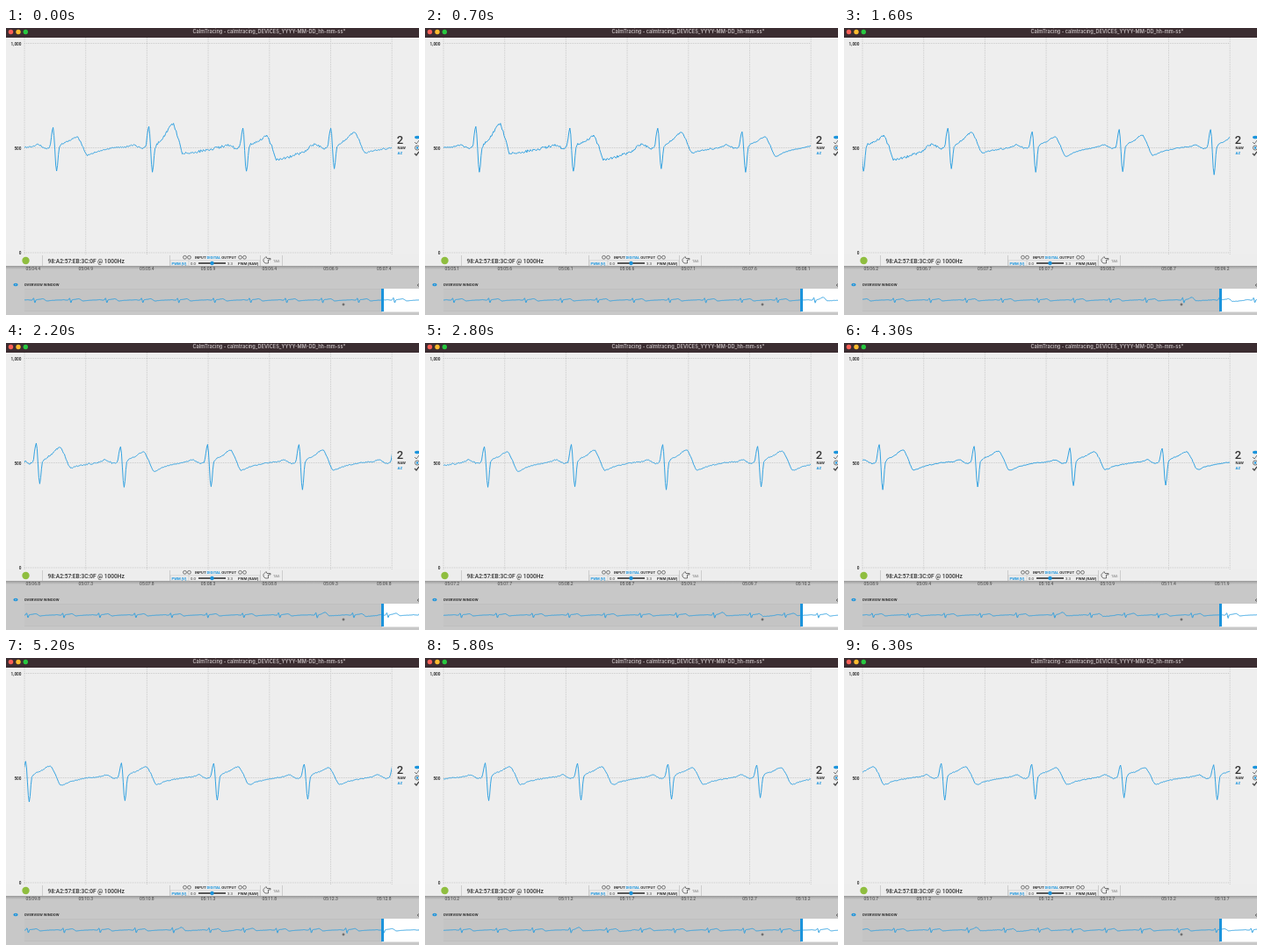
Animation, 470 px wide and 327 px high, one loop 6.4 s. Source, as an HTML page:

```html
<!DOCTYPE html>
<html lang="en">
<head>
<meta charset="utf-8">
<title>Signal monitor</title>
<style>
html, body { margin: 0; width: 100%; height: 100%; overflow: hidden; background: #eee; }
svg { display: block; width: 470px; height: 327px; font-family: Roboto, sans-serif; }
.dots { stroke: #c2c2c2; stroke-width: .8; stroke-dasharray: 1 1; }
.wave { fill: none; stroke: #2b9fe0; stroke-width: .95; stroke-linejoin: round; vector-effect: non-scaling-stroke; }
.small { font-size: 4.3px; font-weight: 700; }
.blue { fill: #1b94dc; }
.line { fill: none; stroke: #444; stroke-width: .7; }
</style>
</head>
<body>
<svg viewBox="0 0 470 327" fill="#333">
  <defs>
    <clipPath id="mainClip"><rect x="21" y="11" width="418" height="247"/></clipPath>
    <clipPath id="overClip"><rect x="21" y="297" width="449" height="26"/></clipPath>
    <linearGradient id="shade" x2="0" y2="1">
      <stop stop-color="#999"/><stop offset="1" stop-color="#c8c8c8"/>
    </linearGradient>
  </defs>

  <rect width="470" height="327" fill="#eee"/>
  <rect width="470" height="11" fill="#3b2d31"/>
  <circle cx="5.5" cy="4.5" r="2.7" fill="#ff5f57"/>
  <circle cx="14" cy="4.5" r="2.7" fill="#febc2e"/>
  <circle cx="22.3" cy="4.5" r="2.7" fill="#28c840"/>
  <text x="299.5" y="6.4" fill="#c4bcbe" text-anchor="middle" font-family="Inter, sans-serif" font-size="5.6" font-weight="600">CalmTracing - calmtracing_DEVICES_YYYY-MM-DD_hh-mm-ss*</text>

  <g id="grid"></g>
  <g font-size="4.7" font-weight="700" text-anchor="end">
    <text x="17.5" y="19.5">1,000</text><text x="17.5" y="138.5">500</text><text x="17.5" y="257.5">0</text>
  </g>
  <g clip-path="url(#mainClip)"><path id="mainWave" class="wave"/></g>

  <text x="444.7" y="131.8" font-size="13" font-weight="500">2</text>
  <text x="445.5" y="138" class="small">RAW</text>
  <text x="445.5" y="144" class="small blue">AZ</text>
  <ellipse cx="468" cy="124.5" rx="3" ry="1.8" class="blue"/>
  <path class="line" d="M465 130l2 2 3-4"/>
  <path class="line" d="M465 143l2 2 3-4" style="stroke-width: 1.3"/>
  <circle cx="468" cy="136.5" r="2.6" class="line"/><circle cx="468" cy="136.5" r="1.2" class="blue"/>

  <rect y="271" width="470" height="56" fill="#c8c8c8"/>
  <rect y="271" width="470" height="4" fill="url(#shade)"/>
  <g id="times" font-size="5" fill="#444"></g>
  <rect y="258.5" width="470" height="12.5" fill="#ededed"/>
  <circle cx="22.5" cy="265" r="4.2" fill="#8fbe3f"/>
  <path d="M41.5 259v12M186.5 259v12M289.5 259v12M314.5 259v12" stroke="#c4c4c4" stroke-width=".8"/>
  <path d="M187 264.8h21v6h-21zM208 264.8h81v6" fill="none" stroke="#c4c4c4" stroke-width=".6"/>
  <text x="47.5" y="268" font-size="6.6" font-weight="500">98:A2:57:EB:3C:0F @ 1000Hz</text>
  <g class="line">
    <circle cx="203.5" cy="261.3" r="1.9"/><circle cx="208.5" cy="261.3" r="1.9"/>
    <circle cx="266.5" cy="261.3" r="1.9"/><circle cx="271.5" cy="261.3" r="1.9"/>
  </g>
  <g class="small">
    <text x="215" y="263">INPUT <tspan class="blue">DIGITAL</tspan> OUTPUT</text>
    <text x="188.5" y="269.7" class="blue">PWM [V]</text>
    <text x="210" y="269.5" font-weight="400">0.0</text>
    <text x="252" y="269.5" font-weight="400">3.3</text>
    <text x="264" y="269.7">PWM [RAW]</text>
  </g>
  <path d="M219 268h31" stroke="#333" stroke-width="1.6"/>
  <circle cx="234.5" cy="268" r="2.2" class="blue"/>
  <path class="line" d="M293 263.5l3-3 1 2h4v1.5h-2.500v4h-3.500l-2-2z"/>
  <text x="304" y="266.6" font-size="4" fill="#777">TAG</text>

  <ellipse cx="11" cy="292.5" rx="2.6" ry="1.7" class="blue"/>
  <circle cx="11" cy="292.5" r=".7" fill="#c8c8c8"/>
  <text x="20.700" y="294.3" class="small">OVERVIEW WINDOW</text>
  <path class="line" d="M470 291.5l-2 1.500 2 1.500"/>
  <rect x="21" y="297" width="407" height="26" fill="#c4c4c4"/>
  <path d="M21 297.5H428M21 322.5H428" stroke="#bebebe" stroke-width=".7"/>
  <rect x="428" y="297" width="42" height="26.500" fill="#fff"/>
  <g clip-path="url(#overClip)"><path id="overWave" class="wave"/></g>
  <rect x="427" y="297" width="3" height="26" class="blue"/>
  <path d="M382.5 315h3M384 313.5v3" stroke="#333" stroke-width=".7"/>
</svg>

<script>
const $ = id => document.getElementById(id);
const PX_PER_SEC = 139.4, STEP = 20.95, BASE = 136.5;
const OVER_X = 0.39, OVER_Y = 0.115;

// Each beat: R position, R top, S dip, T top, T offset, trough
const beats = [
  [54, 114, 163, 124, 27, 145], [163, 112, 164, 109, 27, 143], [270, 115, 164, 123.5, 27, 150],
  [370, 114, 160, 119, 27, 142], [466, 118, 164, 124, 26, 146], [565, 116, 164, 122, 26, 145],
  [669, 116, 167, 122, 27, 145], [777, 118, 164, 123, 28, 145], [886, 120, 163, 124, 28, 144],
  [991, 120, 162, 124, 28, 144], [1094, 121, 161, 125, 28, 144], [1195, 122, 159, 125, 28, 144],
  [1301, 122, 162, 125, 28, 144]
];
for (let k = 1; k <= 12; k++) beats.unshift([54 - 105 * k, 117, 163, 124, 27, 145]);

const rough = x => x > 166 && x < 360;

function beatPoints([x, top, dip, tTop, tAt, trough]) {
  const settle = rough(x + 5) ? [.85, .6, .3] : [.6, .25, 0];
  const points = [
    [-23, 135], [-17, 133], [-12, 135.5], [-8, 137.3], [-4, 136],
    [0, top], [4, dip], [7, 136], [10, 132], [17, 132 - (132 - tTop) * .35],
    [tAt, tTop], [tAt + 5, tTop + (trough - tTop) * .35], [tAt + 12, trough],
    ...settle.map((k, i) => [tAt + 21 + i * 11, BASE + (trough - BASE) * k])
  ];
  return points.map(([dx, y]) => [x + dx, y]);
}

function noise(x) {
  const h = Math.sin(x * 127.1) * 43758.5453;
  const size = rough(x) ? 3.2 : x < 460 ? 1.7 : 1;
  return (h - Math.floor(h) - .5) * size;
}

// Monotone cubic through the points, sampled once per pixel
function wavePath(points) {
  const slope = i => (points[i + 1][1] - points[i][1]) / (points[i + 1][0] - points[i][0]);
  const tangent = i => {
    if (i < 1 || i > points.length - 2) return 0;
    const a = slope(i - 1), b = slope(i);
    return a * b > 0 ? 2 * a * b / (a + b) : 0;
  };
  const out = [];
  for (let i = 0; i < points.length - 1; i++) {
    const [x0, y0] = points[i], [x1, y1] = points[i + 1], w = x1 - x0;
    for (let x = x0; x < x1; x++) {
      const u = (x - x0) / w, v = 1 - u;
      const y = v * v * (1 + 2 * u) * y0 + u * u * (3 - 2 * u) * y1
        + w * u * v * (v * tangent(i) - u * tangent(i + 1));
      out.push(x + " " + (y + noise(x)).toFixed(2));
    }
  }
  return "M" + out.join("L");
}

const path = wavePath(beats.flatMap(beatPoints));
$("mainWave").setAttribute("d", path);
$("overWave").setAttribute("d", path);

const gridX = i => 21 + i * 69.7;
let lines = "", labels = "";
for (let i = 0; i < 7; i++) {
  lines += `<path class="dots" d="M${gridX(i)} 11V258"/>`;
  const [x, anchor] = i === 0 ? [22.5, "start"] : i === 6 ? [438.5, "end"] : [gridX(i), "middle"];
  labels += `<text x="${x}" y="276.3" text-anchor="${anchor}"></text>`;
}
for (const y of [17.5, 136.5, 256]) lines += `<path class="dots" d="M21 ${y}H439"/>`;
$("grid").innerHTML = lines;
$("times").innerHTML = labels;

// Data arrives in fixed chunks at a slightly uneven pace: [ms, chunks]
const pace = [[0, 0], [700, 5], [1600, 12], [2800, 19], [4300, 30], [5200, 36], [6300, 42]];
function chunksAt(ms) {
  const i = Math.max(1, pace.findIndex(p => p[0] >= ms));
  const [t0, n0] = pace[i - 1], [t1, n1] = pace[i];
  return Math.round(n0 + (n1 - n0) * (ms - t0) / (t1 - t0));
}

function draw(now) {
  const ms = Math.floor(now % 6400 / 100) * 100;
  const shift = chunksAt(ms) * STEP;
  $("mainWave").setAttribute("transform", `translate(${-shift - .4} 0)`);
  $("overWave").setAttribute("transform",
    `translate(${428 - (21 + shift) * OVER_X} ${310 - BASE * OVER_Y}) scale(${OVER_X} ${OVER_Y})`);
  [...$("times").children].forEach((label, i) => {
    const tenths = Math.floor((4.42 + shift / PX_PER_SEC + i * .5) * 10);
    label.textContent = "05:" + (tenths / 10).toFixed(1).padStart(4, "0");
  });
  requestAnimationFrame(draw);
}
draw(0);
</script>
</body>
</html>
```
